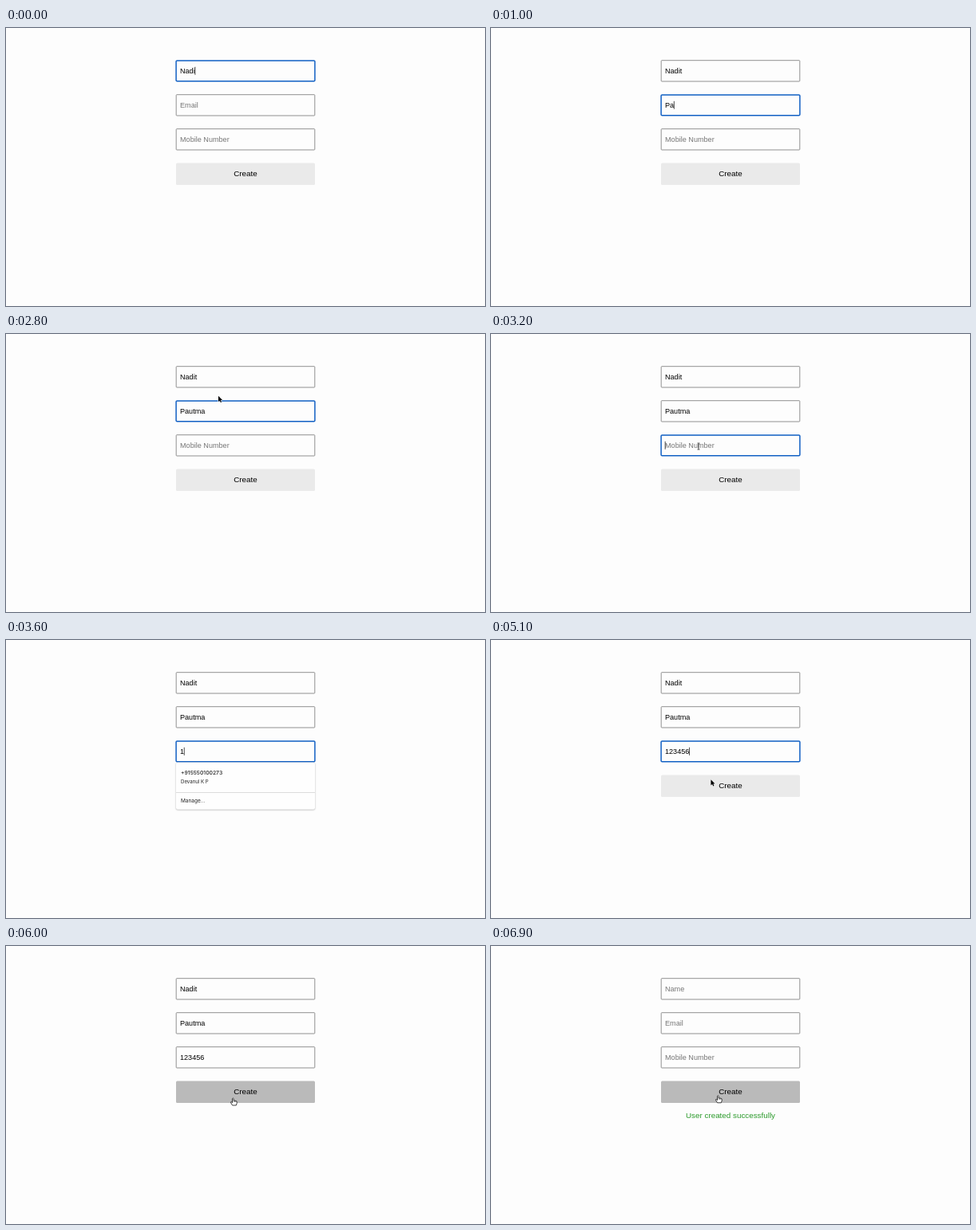
An HTML page with a canvas that plays this animation: 600x349 px, repeating every 8600 ms.

```html
<!DOCTYPE html>
<html lang="en">
<head>
<meta charset="utf-8">
<title>Create user form</title>
<style>
  html, body { margin: 0; width: 100%; height: 100%; overflow: hidden; background: #fdfdfd; }
  canvas { display: block; }
</style>
</head>
<body>
<canvas id="stage" width="600" height="349"></canvas>
<script>
const ctx = document.getElementById('stage').getContext('2d');
const LOOP = 8600, STEP = 100, CLEARED = 6900;
const SANS = '"Liberation Sans", Arial, sans-serif';
const UI = 'Inter, sans-serif';
const INPUT_FONT = `9.1px ${SANS}`, LABEL_FONT = `9.83px ${SANS}`;
const PLACEHOLDERS = ['Name', 'Email', 'Mobile Number'];

// [time, focused field, its value]
const EDITS = [
  [0, 0, 'Nadi'], [100, 0, 'Nadit'],
  [300, 1, ''], [800, 1, 'P'], [1000, 1, 'Pa'], [1100, 1, 'Pau'], [1200, 1, 'Paut'], [1300, 1, 'Pau'],
  [1800, 1, 'Paut'], [1900, 1, 'Pautm'], [2000, 1, 'Paut'], [2200, 1, 'Pautm'], [2300, 1, 'Pautma'],
  [3200, 2, ''], [3500, 2, '1'], [3800, 2, '12'], [4000, 2, '123'], [4200, 2, '1234'],
  [4500, 2, '12345'], [4700, 2, '123456'], [6000, -1, '']
];

// [from, to, top, suggestions]
const PHONE = ['+915550100273', 'Devanul K P'];
const MENUS = [
  [800, 1000, 110, [['pkdevanul@example.com', 'Devanul K P']]],
  [3300, 3600, 153, [PHONE, ['05550100273', 'Devanul K P']]],
  [3600, 3800, 153, [PHONE]]
];

// pointer visits as [time, x, y]
const VISITS = [
  [[2800, 266, 77.8], [3200, 260, 141], [3499, 260, 141]],
  [[5100, 275.4, 175.3], [5300, 282.2, 205], [5400, 283, 203], [5700, 284.3, 194],
   [5900, 284.3, 194], [6100, 284.3, 187.6], [LOOP, 284.3, 187.6]]
];

const ARROW = new Path2D('M0 0V7.2L1.7 5.7L2.9 8.3L4.1 7.8L2.9 5.2H5.1Z');
const HAND = new Path2D('M-.8 .8Q0-.4 .8 .8V3.4Q1.6 2.7 2.3 3.6Q3.2 3 3.8 4Q4.9 3.6 4.9 4.9V6.6L4 9.2H-.7L-2.7 6Q-3.2 4.6-1.9 5L-.8 6Z');

function text(str, x, y, font, color, align = 'left') {
  ctx.font = font;
  ctx.fillStyle = color;
  ctx.textAlign = align;
  ctx.fillText(str, x, y);
}

function box(x, y, w, h, radius) {
  ctx.beginPath();
  ctx.roundRect(x, y, w, h, radius);
}

function line(x1, y1, x2, y2, color, width) {
  ctx.strokeStyle = color;
  ctx.lineWidth = width;
  ctx.beginPath();
  ctx.moveTo(x1, y1);
  ctx.lineTo(x2, y2);
  ctx.stroke();
}

function pointerAt(t) {
  const visit = VISITS.find(v => t >= v[0][0] && t <= v[v.length - 1][0]);
  if (!visit) return null;
  const i = visit.findIndex((key, k) => k && t <= key[0]);
  const [t0, x0, y0] = visit[i - 1], [t1, x1, y1] = visit[i];
  const p = (t - t0) / (t1 - t0);
  return { x: x0 + (x1 - x0) * p, y: y0 + (y1 - y0) * p };
}

function drawField(i, value, focused, caretOn) {
  const y = 40 + 43 * i;
  ctx.strokeStyle = focused ? '#1160c4' : '#858585';
  ctx.lineWidth = focused ? 1.5 : 0.9;
  if (focused) box(213.1, y + 0.9, 173.8, 25.9, 1.2);
  else box(213.2, y + 0.7, 173.6, 26.3, 0.8);
  ctx.stroke();
  text(value || PLACEHOLDERS[i], 218, y + 17, INPUT_FONT, value ? '#000' : '#757575');
  if (focused && caretOn) {
    const x = 218.2 + ctx.measureText(value).width;
    line(x, y + 8.8, x, y + 18.8, '#000', 0.7);
  }
}

function drawMenu(top, rows) {
  const height = 29 + 31 * rows.length;
  ctx.save();
  ctx.shadowColor = 'rgba(0,0,0,.35)';
  ctx.shadowBlur = 2;
  ctx.shadowOffsetY = 0.5;
  ctx.fillStyle = '#fefefe';
  box(213, top + 0.7, 174, height - 1, 2);
  ctx.fill();
  ctx.restore();
  rows.forEach(([title, name], i) => {
    text(title, 219, top + 16.4 + 31 * i, `500 6.8px ${UI}`, '#222');
    text(name, 219, top + 27.2 + 31 * i, `6.1px ${UI}`, '#222');
  });
  const bottom = top + height;
  line(213, bottom - 21.5, 387, bottom - 21.5, '#dcdcdc', 1);
  text('Manage...', 219, bottom - 8.6, `6.5px ${UI}`, '#222');
}

function drawPointer({ x, y }, overButton, overField) {
  ctx.save();
  ctx.translate(x, y);
  ctx.lineJoin = 'round';
  if (overField) {
    line(0, -4, 0, 4, '#222', 0.8);
    line(-1.5, -4, 1.5, -4, '#222', 0.7);
    line(-1.5, 4, 1.5, 4, '#222', 0.7);
  } else {
    ctx.lineWidth = overButton ? 0.8 : 1;
    ctx.strokeStyle = overButton ? '#111' : '#fff';
    ctx.fillStyle = overButton ? '#fff' : '#000';
    const shape = overButton ? HAND : ARROW;
    if (overButton) ctx.fill(shape);
    ctx.stroke(shape);
    if (!overButton) ctx.fill(shape);
    else for (const fx of [0.8, 2.3, 3.6]) line(fx, 3.6, fx, 5.2, '#111', 0.5);
  }
  ctx.restore();
}

function draw(t) {
  const values = ['', '', ''];
  let focus = -1, editedAt = 0;
  for (const [at, field, value] of EDITS) {
    if (at > t) break;
    values[field] = value;
    focus = field;
    editedAt = at;
  }
  if (t >= CLEARED) values.fill('');

  const pointer = pointerAt(t);
  const overButton = t >= 5200 && pointer && pointer.y < 197;
  const overField = t < 5000 && pointer && (pointer.y - 40) % 43 < 27;

  ctx.fillStyle = '#fdfdfd';
  ctx.fillRect(0, 0, 600, 349);
  const caretOn = (t - editedAt) % 1000 < 500;
  for (let i = 0; i < 3; i++) drawField(i, values[i], i === focus, caretOn);

  ctx.fillStyle = overButton ? '#bababa' : '#eaeaea';
  box(213, 169.5, 174, 27.4, 1.5);
  ctx.fill();
  text('Create', 300, 186.4, LABEL_FONT, '#000', 'center');
  if (t >= CLEARED) text('User created successfully', 300, 216.4, LABEL_FONT, '#2a9a2a', 'center');

  for (const [from, to, top, rows] of MENUS) if (t >= from && t < to) drawMenu(top, rows);
  if (pointer) drawPointer(pointer, overButton, overField);
}

function tick() {
  draw(Math.floor(performance.now() % LOOP / STEP) * STEP);
  requestAnimationFrame(tick);
}
tick();
</script>
</body>
</html>
```
